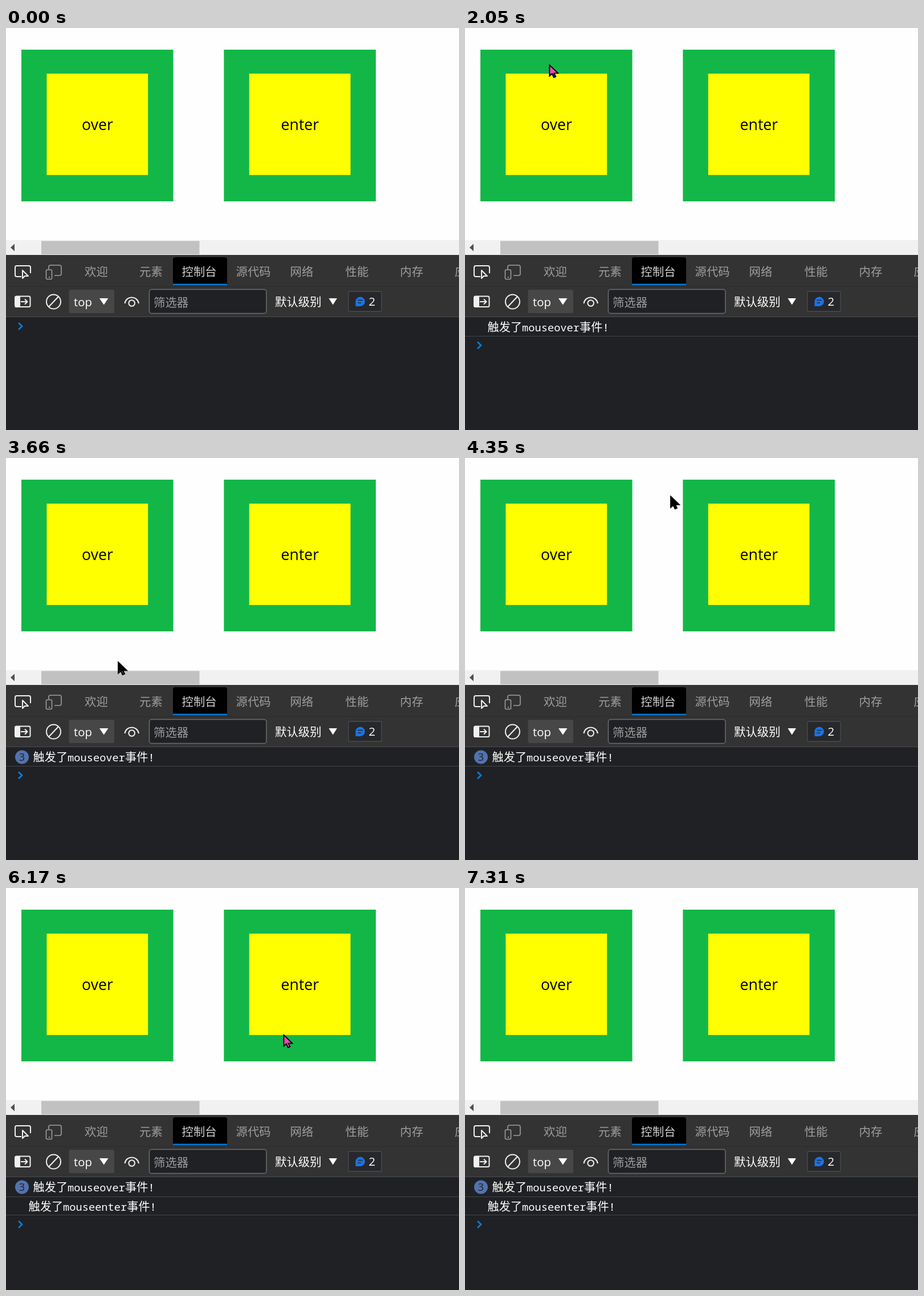
Animation, 795 px wide and 705 px high, one loop 8.19 s. Source, as an HTML page:

```html
<!DOCTYPE html>
<html lang="zh-CN">
<head>
<meta charset="utf-8">
<style>
  html, body { margin: 0; width: 100%; height: 100%; overflow: hidden; background: #fefefe; }
  svg { display: block; width: 795px; height: 705px; }
  text { font-family: "Open Sans", "Noto Sans CJK SC", "Noto Sans CJK", sans-serif; font-size: 20.4px; fill: #fff; }
  .label { font-size: 26.7px; fill: #000; text-anchor: middle; }
  .tabs text, .dim { fill: #9e9e9e; }
  .tabs .active { fill: #d0d0d0; }
  .log text { font-family: "Noto Sans CJK SC", "Noto Sans CJK", sans-serif; font-size: 20.2px; font-weight: 300; }
  .log tspan { font-family: "Noto Sans Mono", monospace; font-size: 18.7px; font-weight: 400; }
  .log .count { font: 18px "Open Sans", sans-serif; fill: #202124; text-anchor: middle; }
  .log path { stroke: #434548; }
  .line { fill: none; stroke: #f0f0f0; stroke-width: 2; stroke-linejoin: round; }
  .invert { mix-blend-mode: difference; }
</style>
</head>
<body>
<svg viewBox="0 0 795 705">
  <rect width="795" height="705" fill="#fefefe"/>
  <g id="boxes"></g>

  <rect y="372" width="795" height="26" fill="#f1f1f1"/>
  <rect x="62" y="373.5" width="277.5" height="23.5" fill="#c1c1c1"/>
  <path d="M15 378.500v13l-7-6.500z" fill="#505050"/>

  <rect y="398" width="795" height="108" fill="#333"/>
  <rect y="506" width="795" height="199" fill="#202124"/>
  <path d="M0 453.500h795" stroke="#2c2c2c"/>
  <path d="M0 506.500h795" stroke="#494c50"/>

  <path d="M293 451v-45q0-4 4-4h87q4 0 4 4v45z" fill="#000"/>
  <rect x="293" y="448.500" width="95" height="2.500" fill="#0078d4"/>
  <g class="tabs" id="tabs"></g>

  <g class="line">
    <path d="M27 436h-8q-3 0-3-3v-13q0-3 3-3h21q3 0 3 3v10M29 425v14l4-4h6z"/>
    <path d="M75 423v-4q0-3 3-3h16q3 0 3 3v12q0 3-3 3h-9M87 434h7" stroke="#9e9e9e" stroke-width="1.600"/>
    <rect x="70.500" y="424" width="10" height="16.500" rx="2" stroke="#9e9e9e" stroke-width="1.600"/>
    <path d="M75 437h2" stroke="#9e9e9e"/>
    <rect x="16" y="470.500" width="26.500" height="18.500" rx="2.500"/>
    <path d="M17 471h7v18h-7z" fill="#f0f0f0"/>
    <path d="M26 480h11M33 475.500l4.500 4.500-4.500 4.500"/>
    <circle cx="83.500" cy="480" r="12.500"/>
    <path d="M75 489l17-18"/>
    <path d="M208.500 483c2-14 22-14 24.500 0"/>
    <circle cx="220.700" cy="482.500" r="5.300"/>
  </g>

  <rect x="110.500" y="459" width="79.500" height="41" rx="3" fill="#474747"/>
  <text x="119" y="487.500">top</text>
  <path d="M164 474h15.500l-7.750 11.500z" fill="#fff"/>
  <rect x="251.500" y="458.500" width="205.500" height="42" rx="4" fill="#202124" stroke="#6c6d70" stroke-width="1.500"/>
  <text class="dim" x="259" y="489">筛选器</text>
  <text x="472" y="487.500">默认级别</text>
  <path d="M566.500 474h14.500l-7.250 11.500z" fill="#fff"/>
  <rect x="601" y="462" width="58" height="35" rx="2" fill="#26282b" stroke="#4a4c50" stroke-width="1.300"/>
  <path d="M613.500 488v-8a8.200 8.200 0 1 1 8.200 8z" fill="#1a73e8"/>
  <path d="M617.500 477.500h8.500M617.500 482h5.500" stroke="#26282b" stroke-width="1.700"/>
  <text x="636.500" y="486.500">2</text>

  <g class="log">
    <g id="overRow">
      <g id="badge"><circle cx="28" cy="524.500" r="12" fill="#5272b0"/><text class="count" id="count" x="28" y="531"></text></g>
      <text id="overText" y="532">触发了<tspan>mouseover</tspan>事件<tspan>!</tspan></text>
      <path id="overLine" d="M0 540h795"/>
    </g>
    <g id="enterRow">
      <text x="39.500" y="565.500">触发了<tspan>mouseenter</tspan>事件<tspan>!</tspan></text>
      <path d="M0 573.500h795"/>
    </g>
  </g>
  <path id="prompt" d="M22 517l6 6-6 6" fill="none" stroke="#0b7bd3" stroke-width="2.800"/>

  <path id="fill" class="invert" fill="#fff" d="M0 0V21L5 17L8 23.500L11.500 22L8.500 15.500H16Z"/>
  <path id="edge" fill="none" stroke="#000" stroke-width="1.800" d="M.5 1V20.500L5 16.500L8 23L11.500 21.500L8.500 15.500H15.500Z"/>
</svg>
<script>
const $ = id => document.getElementById(id);
const LOOP = 8190, START = 1390, END = 7310, STEP = 40.5;

$('boxes').innerHTML = [['over', 27], ['enter', 382.4]].map(([name, x]) => `
  <rect x="${x}" y="38" width="266.600" height="266" fill="#13b748"/>
  <rect x="${x + 44.4}" y="80" width="177.800" height="177.800" fill="#ff0"/>
  <text class="label" x="${x + 133.5}" y="179">${name}</text>`).join('');

$('tabs').innerHTML = [['欢迎', 138], ['元素', 234], ['控制台', 308.5], ['源代码', 403.5],
  ['网络', 498.500], ['性能', 595.500], ['内存', 691.500], ['应用程序', 787.500]].map(([name, x]) =>
  `<text x="${x}" y="434.500"${x === 308.5 ? ' class="active"' : ''}>${name}</text>`).join('');

// Pointer tip: time, x, y
const path = [
  [1390, 232, 0], [1700, 196, 13], [1940, 163, 38], [2050, 146, 67], [2170, 147, 80],
  [2500, 144, 150], [2860, 140, 229], [2980, 143, 258], [3060, 148, 265], [3300, 156, 305],
  [3500, 165, 342], [3700, 205, 361], [3800, 250, 363], [3900, 302, 349], [4100, 335, 230],
  [4350, 361, 64], [4500, 380, 14], [4780, 437, 1], [5000, 464, 8], [5200, 479, 38],
  [5450, 477, 95], [5620, 477, 131], [6170, 487, 257], [6480, 487, 295], [6780, 490, 345],
  [6980, 550, 408], [7270, 800, 441]
];

function tipAt(t) {
  const i = Math.max(1, path.findIndex(p => p[0] > t));
  const a = path[i - 1], b = path[i], k = (t - a[0]) / (b[0] - a[0]);
  return [1, 2].map(n => (a[n] + (b[n] - a[n]) * k).toFixed(1));
}

const show = (id, on) => $(id).setAttribute('visibility', on ? 'inherit' : 'hidden');

function draw() {
  const t = performance.now() % LOOP;
  const overs = [1940, 2200, 2980].filter(at => t >= at).length;
  const entered = t >= 5200;

  show('overRow', overs > 0);
  show('badge', overs > 1);
  show('enterRow', entered);
  $('count').textContent = overs;
  $('overText').setAttribute('x', overs > 1 ? 47.5 : 39.5);
  $('overLine').setAttribute('transform', `translate(0 ${entered ? 1.5 : .5})`);
  $('prompt').setAttribute('transform', `translate(0 ${33.5 * ((overs > 0) + entered)})`);

  const step = START + Math.floor((t - START) / STEP) * STEP;
  const visible = t >= START && t < END && step < 7270;
  for (const id of ['fill', 'edge']) {
    show(id, visible);
    if (visible) $(id).setAttribute('transform', `translate(${tipAt(step)})`);
  }
  requestAnimationFrame(draw);
}
draw();
</script>
</body>
</html>
```
